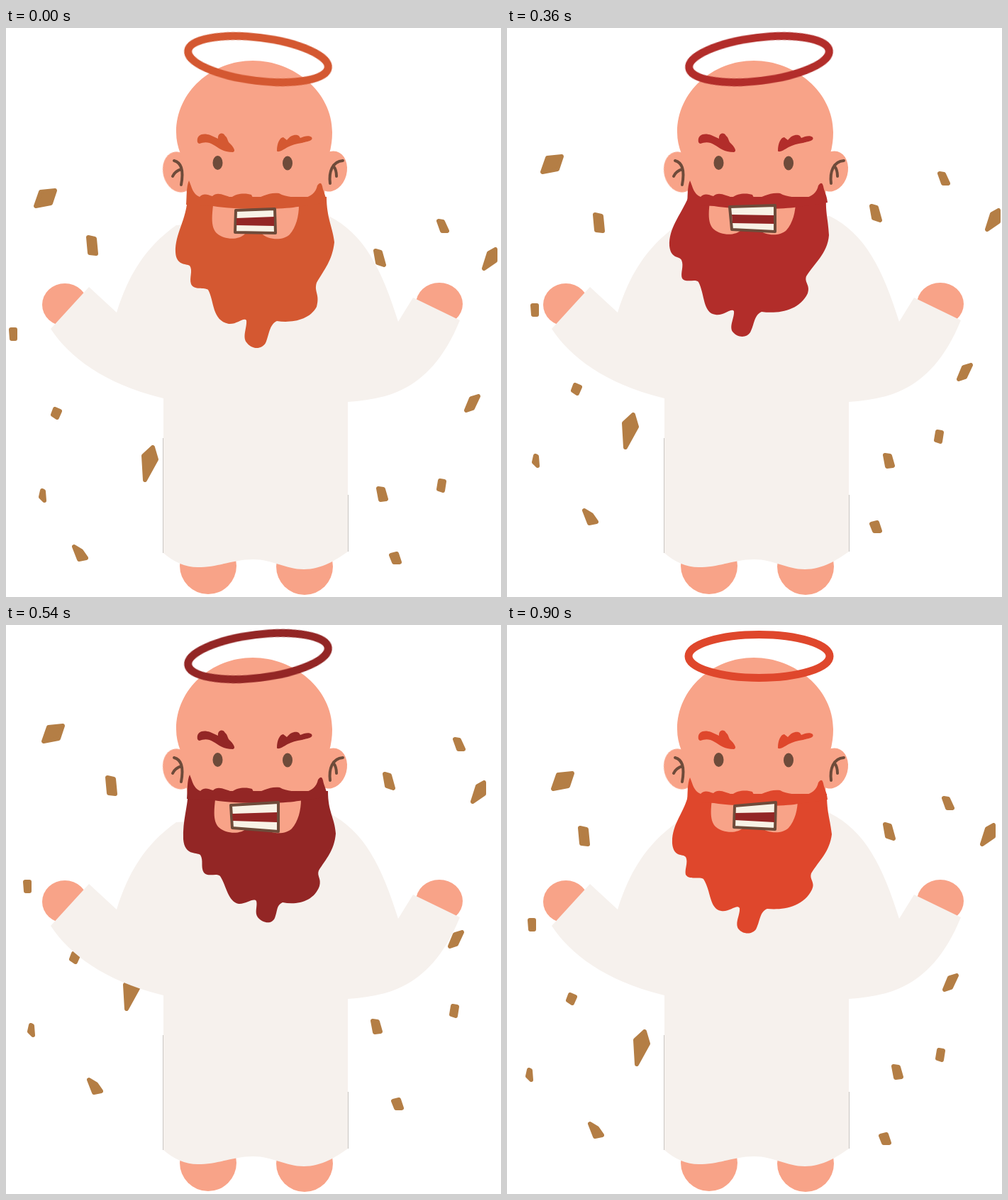
Write an HTML page without scripts that moves like this. It is 698x802 px and loops after 1.08 s.

```html
<!DOCTYPE html>
<html lang="en">
<head>
<meta charset="utf-8">
<title>Angry bearded angel</title>
<style>
  html, body { margin: 0; width: 100%; height: 100%; overflow: hidden; background: #fff; }
  svg { display: block; width: 698px; height: 802px; }

  /* Four poses played there and back: a b c d c b */
  .hair, .pose, .beard, .gums, .teeth { animation: 1.08s step-end infinite; }
  .hair { animation-name: blush; }
  .pose { --a: none; animation-name: pose; }
  .beard { animation-name: beard; }
  .teeth { animation-name: teeth; }
  .gums { animation-name: gums; }

  @keyframes blush {
    0% { color: #d45831; }
    16.6667%, 83.3333% { color: #df472c; }
    33.3333%, 66.6667% { color: #b22d2a; }
    50% { color: #932625; }
  }
  @keyframes pose {
    0% { transform: var(--a); }
    16.6667%, 83.3333% { transform: var(--b); }
    33.3333%, 66.6667% { transform: var(--c); }
    50% { transform: var(--d); }
  }
  @keyframes beard {
    0% { d: path("M256 238C255 270 238 290 239 316C240 335 254 332 259 335C264 342 258 352 261 361C265 370 280 365 285 369C294 385 290 412 314 417C326 418 335 407 339 412C340 422 333 435 339 443C346 453 360 454 366 444C371 433 371 418 382 413C402 416 428 412 438 393C443 375 434 372 438 359C449 340 460 328 463 302C461 282 452 268 452 238Z"); }
    16.6667%, 83.3333% { d: path("M256 238C250 265 232 280 233 308C235 328 248 322 252 327C256 335 250 344 252 352C257 360 272 354 277 358C288 375 285 400 302 403C314 405 324 393 328 399C329 408 321 420 326 428C333 437 346 436 351 429C357 418 356 404 367 400C388 402 418 398 430 373C435 362 426 359 429 350C440 332 455 320 458 295C456 275 451 265 451 238Z"); }
    33.3333%, 66.6667% { d: path("M256 238C244 265 228 282 229 307C231 326 243 321 246 327C250 335 244 346 247 353C252 360 266 353 270 358C279 375 276 402 294 404C306 406 316 394 320 399C321 408 313 420 318 428C325 437 338 437 343 429C349 418 348 405 359 400C382 403 412 399 424 374C428 362 419 359 422 350C433 332 452 318 454 292C453 270 449 262 450 238Z"); }
    50% { d: path("M257 234C256 258 249 275 250 302C252 325 268 320 274 324C279 332 274 341 279 349C285 356 297 349 302 354C311 368 313 390 328 393C338 394 349 384 353 389C355 396 350 405 355 412C363 421 375 422 379 413C383 403 381 395 390 391C410 395 434 390 442 368C445 357 438 354 441 346C451 330 463 318 465 294C463 270 454 264 454 234Z"); }
  }
  @keyframes teeth {
    0% { d: path("M324 257 379 255 380 289 323 288Z"); }
    16.6667%, 83.3333% { d: path("M321 255 379 250 378 288 320 285Z"); }
    33.3333%, 66.6667% { d: path("M314 252 378 250 378 287 317 284Z"); }
    50% { d: path("M317 254 384 250 384 291 319 286Z"); }
  }
  @keyframes gums {
    0% { d: path("M325 268 378 266 378 279 325 278Z"); }
    16.6667%, 83.3333% { d: path("M322 265 377 264 377 278 322 275Z"); }
    33.3333%, 66.6667% { d: path("M317 263 376 264 376 276 318 275Z"); }
    50% { d: path("M319 266 382 264 382 278 320 276Z"); }
  }

  .confetti { fill: #b47e45; stroke: #b47e45; stroke-width: 6; stroke-linejoin: round; }
  .robe { fill: #f6f1ed; }
  .shade { stroke: #c9c5c2; }
  .hair { fill: currentColor; }
  .skin { fill: #f8a388; }
  .halo { fill: none; stroke: currentColor; stroke-width: 11; transform-origin: 355.5px 44px;
    --a: rotate(7deg); --b: rotate(0deg); --c: rotate(-7deg); --d: rotate(-7deg); }
  .cheeks { --b: translate(-3px, -5px); --c: translate(-6px, -6px); --d: translate(3px, -4px); }
  .moustache { --b: none; --c: none; --d: translate(1px, -4px); }
  .eyes { fill: #6e4b3a; }
  .ears { fill: none; stroke: #6e4b3a; stroke-width: 4; stroke-linecap: round; }
  .teeth { fill: #f8f2e6; stroke: #6e4b3a; stroke-width: 4; stroke-linejoin: round; }
  .gums { fill: #932625; }
</style>
</head>
<body>
<svg viewBox="0 0 698 802">
  <g class="confetti">
    <path class="pose" style="--b:translate(23px,-20px);--c:translate(8px,-48px);--d:translate(11px,-87px)" d="M49 231 69 229 63 247 42 251Z"/>
    <path class="pose" style="--b:translate(-13px,-9px);--c:translate(8px,-32px);--d:translate(27px,-80px)" d="M116 295 125 297 127 318 118 317Z"/>
    <path class="pose" style="--b:translate(12px,-33px);--c:translate(-7px,-63px);--d:translate(13px,-104px)" d="M521 314 528 316 533 334 524 331Z"/>
    <path class="pose" style="--b:translate(6px,-28px);--c:translate(0,-67px);--d:translate(23px,-111px)" d="M610 272 616 273 622 286 615 286Z"/>
    <path class="pose" style="--b:translate(-4px,-30px);--c:translate(3px,-55px);--d:translate(-16px,-90px)" d="M681 317 690 312 690 328 674 339Z"/>
    <path class="pose" style="--b:translate(25px,-9px);--c:translate(29px,-34px);--d:translate(20px,-63px)" d="M7 425 13 425 13 438 8 438Z"/>
    <path class="pose" style="--b:translate(20px,-16px);--c:translate(27px,-34px);--d:translate(26px,-74px)" d="M69 537 76 540 72 549 66 545Z"/>
    <path class="pose" style="--b:translate(-13px,-18px);--c:translate(-29px,-46px);--d:translate(-26px,-96px)" d="M207 591 212 608 196 637 194 603Z"/>
    <path class="pose" style="--b:translate(-20px,-25px);--c:translate(-11px,-49px);--d:translate(-16px,-88px)" d="M51 652 53 653 54 666 49 661Z"/>
    <path class="pose" style="--b:translate(21px,-28px);--c:translate(13px,-51px);--d:translate(21px,-90px)" d="M96 731 106 737 113 747 103 749Z"/>
    <path class="pose" style="--b:translate(-32px,-25px);--c:translate(-12px,-44px);--d:translate(-23px,-86px)" d="M656 522 666 519 658 536 649 539Z"/>
    <path class="pose" style="--b:translate(-3px,-39px);--c:translate(-5px,-69px);--d:translate(18px,-101px)" d="M612 638 618 639 616 652 610 650Z"/>
    <path class="pose" style="--b:translate(20px,-27px);--c:translate(8px,-47px);--d:translate(-8px,-91px)" d="M525 649 532 650 536 664 528 665Z"/>
    <path class="pose" style="--b:translate(-16px,-23px);--c:translate(-29px,-44px);--d:translate(3px,-72px)" d="M543 743 551 741 555 753 547 753Z"/>
  </g>

  <g class="skin">
    <ellipse cx="83" cy="390" rx="32" ry="30"/>
    <ellipse cx="611" cy="389" rx="33" ry="30"/>
    <circle cx="285" cy="758" r="40"/>
    <circle cx="421" cy="759" r="40"/>
  </g>
  <path class="robe" d="M240 278C195 310 172 350 156 401L117 365 63 424C90 465 140 502 222 522V740Q245 760 270 760C300 760 320 749 349 749C375 749 395 763 420 763C445 763 465 750 482 738V527C540 523 600 510 640 412L574 380 553 414C530 340 505 290 455 265Z"/>
  <path class="shade" d="M221.5 578V740M482.5 658V738"/>

  <g class="skin">
    <ellipse rx="22" ry="29" transform="translate(243.5 203) rotate(-15)"/>
    <ellipse rx="22" ry="29" transform="translate(458.5 202) rotate(15)"/>
    <path d="M240 147C240 90 290 46 348 46S460 90 460 147Q460 162 456 177L447 250H258L246 177Q240 162 240 147Z"/>
  </g>
  <path class="ears" d="M237 187C249 190 250 205 247 221M235 209Q238 202 247 199M475 187C460 188 455 203 457 219M466 209Q466 200 462 195"/>
  <g class="eyes">
    <ellipse cx="298.5" cy="190" rx="7" ry="10"/>
    <ellipse cx="397" cy="190.5" rx="7" ry="10"/>
  </g>

  <g class="hair">
    <ellipse class="halo pose" cx="355.5" cy="44" rx="99.5" ry="30.5"/>
    <path d="M270 161C268 151 277 147 288 151L299 156C298 148 306 146 309 152C313 155 312 160 316 163C322 169 324 174 320 175C306 175 300 169 293 165C285 160 279 161 273 163Q271 163 270 161Z"/>
    <path d="M382 173C382 163 386 154 391 154L396 158C401 151 409 149 413 152L415 155C421 152 428 151 431 154C434 159 424 160 417 162C409 163 403 165 397 168C389 173 383 176 382 173Z"/>
    <path class="beard" d="M256 238H452L463 302 357 451 239 316Z"/>
    <path class="skin cheeks pose" d="M292 250C290 268 289 282 298 290C307 298 328 300 337 290H361C370 299 391 300 400 291C409 281 413 265 413 250Z"/>
    <path class="moustache pose" d="M258 215C262 224 263 234 273 238C279 232 284 235 291 237C298 230 308 236 318 239C325 232 340 233 346 235L349 241C360 239 370 231 385 233C395 239 408 238 418 240C430 238 437 232 439 222Q444 215 446 223C447 230 451 235 452 246C430 250 415 251 405 253C380 256 320 256 292 251L254 249C255 238 254 224 258 215Z"/>
  </g>
  <path class="teeth" d="M324 257 379 255 380 289 323 288Z"/>
  <path class="gums" d="M325 268 378 266 378 279 325 278Z"/>
</svg>
</body>
</html>
```
